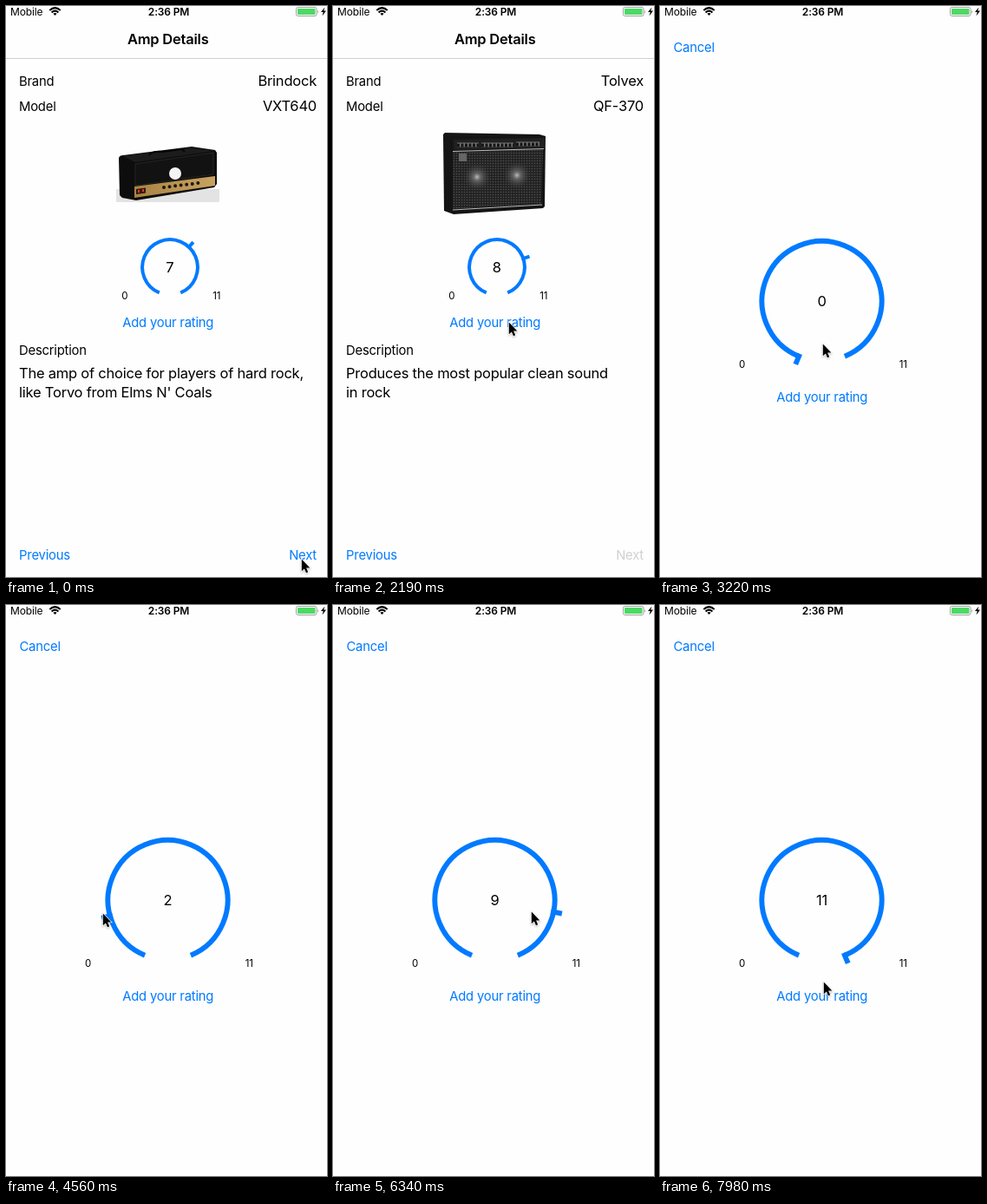
An HTML page that plays this animation: 370 px wide and 658 px high, repeating every 8000 ms.

```html
<!DOCTYPE html>
<html lang="en">
<head>
<meta charset="utf-8">
<title>Amp Details</title>
<style>
  html, body { margin: 0; width: 100%; height: 100%; overflow: hidden; background: #fefefe; }
  svg { display: block; width: 100%; height: 100%; }
  text { font: 14.8px Inter, Roboto, sans-serif; letter-spacing: -.0135em; fill: #000; }
  .big { font-size: 16.5px; }
  .small { font-size: 11.5px; }
  .bold { font-weight: 600; }
  .status { font-size: 12px; }
  .end { text-anchor: end; }
  .mid { text-anchor: middle; }
  .link { fill: #007aff; }
  .dial { fill: none; stroke: #007aff; }
  #cursor { filter: drop-shadow(0 1px 1px #0004); }
</style>
</head>
<body>
<svg viewBox="0 0 370 658">
  <defs>
    <radialGradient id="cone">
      <stop offset="0" stop-color="#b8b8b8"/>
      <stop offset=".25" stop-color="#666"/>
      <stop offset="1" stop-color="#333" stop-opacity="0"/>
    </radialGradient>
    <linearGradient id="gold">
      <stop offset="0" stop-color="#a88343"/>
      <stop offset="1" stop-color="#c8a260"/>
    </linearGradient>
    <pattern id="mesh" width="3" height="3" patternUnits="userSpaceOnUse">
      <rect width="3" height="3" fill="#222"/>
      <circle cx="1.5" cy="1.5" r=".8" fill="#505050"/>
    </pattern>
  </defs>

  <g id="details">
    <rect width="370" height="658" fill="#fefefe"/>
    <text class="big bold mid" x="186.7" y="44">Amp Details</text>
    <path d="M0 60.5H370" stroke="#d0d0d0"/>
    <text x="15" y="92">Brand</text>
    <text x="15" y="121">Model</text>
    <text id="brand" class="big end" x="358" y="92"></text>
    <text id="model" class="big end" x="358" y="121"></text>

    <g id="head">
      <path d="M127 211H246V226H127Z" fill="#e3e3e3"/>
      <path d="M130 175Q131 172 135 172L214 162 241 166 243 169V205L240 209 150 224 134 221 131 218Z" fill="#0d0d0d"/>
      <path d="M135 173L214 163.5 240 167 149 180Z" fill="#1c1c1c"/>
      <path d="M165 172Q168 167 180 168L203 165 206 168" fill="none" stroke="#050505" stroke-width="2"/>
      <path d="M149 182L239 169V194L149 207Z" fill="#121212" stroke="#3a352a" stroke-width=".6"/>
      <path d="M148 208L241 196V207L148 221Z" fill="url(#gold)"/>
      <path d="M150 211L161 209.5V215.5L150 217Z" fill="#351812"/>
      <path d="M153 212V215M158 211V214" stroke="#d53c2c" stroke-width="2"/>
      <path d="M182 209L222 204" stroke="#1b1712" stroke-width="4" stroke-linecap="round" stroke-dasharray="0 6.6"/>
      <circle cx="195" cy="193" r="7" fill="#f4f4f4"/>
    </g>

    <g id="combo">
      <path d="M127 148L129 146 238 148 245 150 244 231 242 233 139 240 128 236Z" fill="#141414"/>
      <path d="M139 154L244 152V163L139 166Z" fill="#202020"/>
      <path d="M143 160H168M171 160H208M211 159H238" stroke="#777" stroke-width="5"/>
      <path d="M143 160.5H168M171 160.5H208M211 159.5H238" stroke="#161616" stroke-width="4" stroke-dasharray="3 1.5"/>
      <path d="M138 168L242 165 240 228 138 234Z" fill="url(#mesh)"/>
      <circle cx="166" cy="197" r="16" fill="url(#cone)"/>
      <circle cx="212" cy="195" r="16" fill="url(#cone)"/>
      <path d="M138 167.5L243 164.5M138 235L241 229" stroke="#bcbcbc"/>
      <rect x="145" y="170" width="9" height="9" fill="#666"/>
    </g>

    <g class="dial" transform="translate(189 301)" stroke-width="4">
      <circle r="31.9" pathLength="360" stroke-dasharray="315 45" transform="rotate(112.5)"/>
      <path id="smallPointer" d="M29.9 0H39.5"/>
    </g>
    <text id="smallValue" class="big mid" x="188.7" y="307"></text>
    <text class="small mid" x="136.8" y="338">0</text>
    <text class="small mid" x="242.7" y="338">11</text>
    <text id="rateLink" class="link mid" x="186.7" y="369.7">Add your rating</text>

    <text x="15" y="402">Description</text>
    <text id="line1" class="big" x="15" y="429"></text>
    <text id="line2" class="big" x="15" y="451"></text>
    <text class="link" x="15" y="637.5">Previous</text>
    <text id="next" class="end" x="358" y="637.5">Next</text>
  </g>

  <g id="sheet">
    <rect width="370" height="658" fill="#fefefe"/>
    <text class="link" x="15.5" y="52.5">Cancel</text>
    <g class="dial" transform="translate(186.5 340)" stroke-width="5.9">
      <circle r="69" pathLength="360" stroke-dasharray="315 45" transform="rotate(112.5)"/>
      <path id="bigPointer" d="M66 0H79"/>
    </g>
    <text id="bigValue" class="big mid" x="186.5" y="346"></text>
    <text class="small mid" x="94.5" y="416.5">0</text>
    <text class="small mid" x="280.3" y="416.5">11</text>
    <text class="link mid" x="186.7" y="456.3">Add your rating</text>
  </g>

  <g id="statusBar">
    <text class="status" x="5" y="10.7">Mobile</text>
    <text class="status bold mid" x="187.5" y="10.7">2:36 PM</text>
    <g fill="none" stroke="#000" stroke-width="2">
      <path d="M50.3 5Q56.5 -.8 62.7 5M52.6 7.4Q56.5 3.8 60.4 7.4"/>
      <path d="M54.4 8.8Q56.5 7 58.6 8.8L56.5 11Z" fill="#000" stroke="none"/>
    </g>
    <rect x="334.5" y="1.5" width="23.5" height="10" rx="2" fill="none" stroke="#a0a0a0"/>
    <rect x="336" y="3" width="20.5" height="7" rx=".7" fill="#4cd964"/>
    <path d="M359.2 4.5Q361 6.5 359.2 8.5Z" fill="#a0a0a0"/>
    <path d="M367.5 1.5L363 7H365.7L364.5 11.5 369 5.6H366.2Z"/>
  </g>

  <path id="cursor" d="M.8 .5V14.3L3.9 11.4 6 16.2 8.2 15.3 6.1 10.6H10.4Z" stroke="#fff" stroke-width="1.4" paint-order="stroke"/>
</svg>

<script>
const LOOP = 8000, SWEEP = 315, START = -247.5, MAX = 11;
const $ = id => document.getElementById(id);

const amps = [
  { brand: "Brindock", model: "VXT640", smallValue: 7,
    line1: "The amp of choice for players of hard rock,", line2: "like Torvo from Elms N' Coals" },
  { brand: "Tolvex", model: "QF-370", smallValue: 8,
    line1: "Produces the most popular clean sound", line2: "in rock" },
];

// Cursor path: step, x, y
const path = [
  [0, 340, 637], [1, 340, 633], [7, 340, 633], [9, 318, 590], [13, 220, 393], [15, 202, 364],
  [20, 202, 364], [22, 187, 389], [25, 156, 409], [26, 157, 409], [27, 157, 409],
  [29, 128, 388], [31, 111, 355], [33, 109, 328], [35, 118, 302], [37, 141, 285],
  [39, 180, 276], [40, 205, 287], [42, 230, 338], [43, 228, 353], [45, 216, 385],
  [47, 199, 399], [51, 199, 399], [54, 188, 434],
];

const clamp = (v, lo = 0, hi = 1) => Math.min(hi, Math.max(lo, v));
const smooth = u => u * u * (3 - 2 * u);
const angleOf = value => START + SWEEP * value / MAX;

// The screen refreshes in steps of roughly 147 ms.
const stepAt = ms => ms < 2625 ? Math.floor((ms + 6) / 146) : 18 + Math.floor((ms - 2625) / 148.4);

function cursorAt(step) {
  const i = clamp(path.findIndex(p => p[0] >= step), 1, path.length - 1);
  const [a, ax, ay] = path[i - 1], [b, bx, by] = path[i];
  const u = clamp((step - a) / (b - a));
  return [ax + (bx - ax) * u, ay + (by - ay) * u];
}

// The knob trails slightly behind the pointer that drags it.
function knobAngle(step) {
  if (step < 28) return START;
  const [x, y] = cursorAt(step - 0.3);
  const deg = Math.atan2(y - 340, x - 186.5) * 180 / Math.PI;
  return clamp(deg > 90 ? deg - 360 : deg, START, START + SWEEP);
}

function nextColor(step) {
  if (step < 3) return "#007aff";
  if (step === 3) return "#cce4ff";
  const grey = [244, 224, 208][Math.min(step - 4, 2)];
  return `rgb(${grey},${grey},${grey})`;
}

function draw(ms) {
  const step = stepAt(ms);
  const second = step >= 4;
  const amp = amps[+second];
  for (const id in amp) $(id).textContent = amp[id];
  $("head").style.display = second ? "none" : "";
  $("combo").style.display = second ? "" : "none";
  $("next").style.fill = nextColor(step);
  $("rateLink").style.opacity = step === 18 ? 0.2 : 1;

  const rating = 7 + smooth(clamp((step - 3.5) / 1.7));
  $("smallPointer").setAttribute("transform", `rotate(${angleOf(rating)})`);

  const rise = clamp((step - 18.6) / 3.4);
  $("sheet").setAttribute("transform", `translate(0 ${658 * (1 - rise) ** 3})`);

  const angle = knobAngle(step);
  $("bigPointer").setAttribute("transform", `rotate(${angle})`);
  $("bigValue").textContent = Math.round((angle - START) / SWEEP * MAX);

  $("cursor").setAttribute("transform", `translate(${cursorAt(step)})`);
}

const begin = performance.now();
function tick() {
  draw((performance.now() - begin) % LOOP);
  requestAnimationFrame(tick);
}
tick();
</script>
</body>
</html>
```
